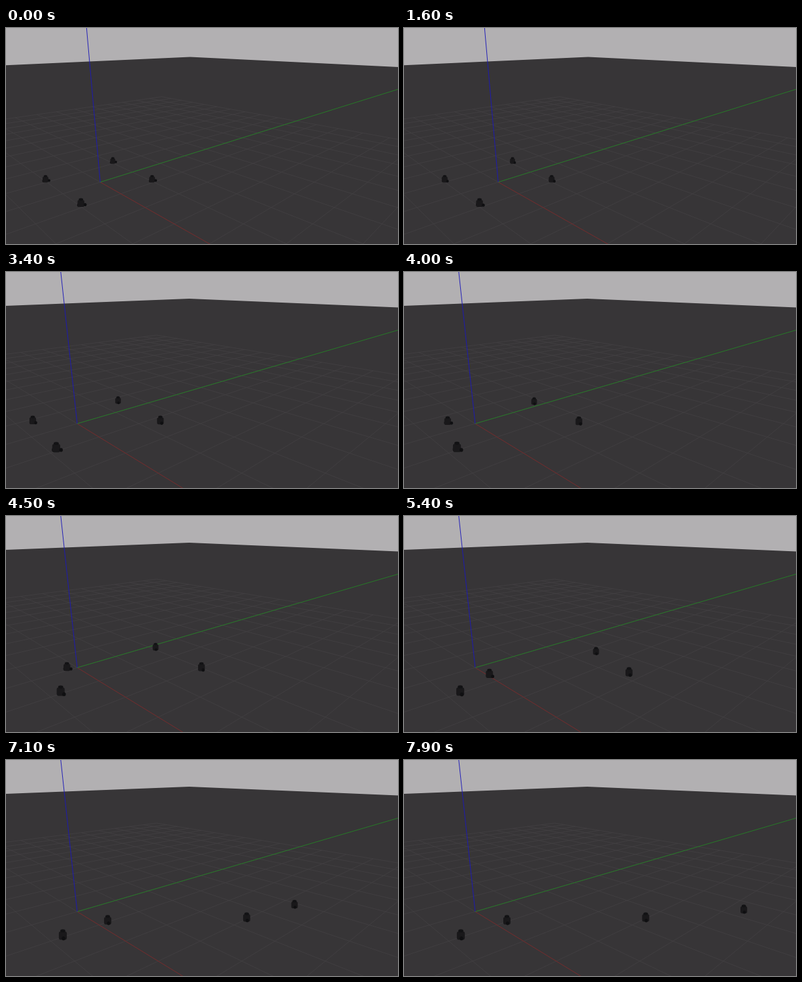
Recreate the animation shown at these times as an HTML page with a canvas. Size 600 by 332 pixels, loop 8 s.

```html
<!DOCTYPE html>
<html lang="en">
<head>
<meta charset="utf-8">
<title>Robots on a ground plane</title>
<style>
html, body { margin: 0; width: 100%; height: 100%; overflow: hidden; background: #373537; }
canvas { display: block; width: 600px; height: 332px; }
</style>
</head>
<body>
<canvas id="stage" width="600" height="332"></canvas>
<script>
const ctx = document.getElementById('stage').getContext('2d');
const W = 600, H = 332, LOOP = 8000, STEP = 100;
const FOCAL = 519.6, PITCH = 0.275643, NEAR = 0.2;
const COS = Math.cos(PITCH), SIN = Math.sin(PITCH);

// World origin relative to the camera, before and after the zoom
const FAR = { ahead: 8.3, right: -2.69, height: 3.62 };
const CLOSE = { ahead: 7.22, right: -2.863, height: 3.087 };

// Ground points are [ahead, right] of the origin as the camera faces;
// mid is the second when a robot is halfway, swing how far it turns aside
const ROBOTS = [
  { from: [1.66, -0.08], to: [-0.05, 6.22], mid: 3.4, swing: 0, cruise: true },
  { from: [0.21, -1.53], to: [-0.465, 0.863], mid: 4.4, swing: 1.2 },
  { from: [0.21, 1.35], to: [-0.32, 3.88], mid: 4.25, swing: 0.3 },
  { from: [-1.19, -0.09], to: [-1.16, 0.13], mid: 3.4, swing: 1.2 }
];
const SOFT = 0.65, SHARP = 0.35, LAG = 0.5, CRUISE_TIME = 4.5;

const mix = (a, b, k) => a + (b - a) * k;

// Smooth step around mid, and a smooth start into constant speed
const settle = (t, mid, width) => 1 / (1 + Math.exp((mid - t) / width));
const cruise = (t, mid, width) =>
  width * Math.log(1 + Math.exp((t - mid) / width)) / CRUISE_TIME;

function viewAt(t) {
  const k = Math.min(1, Math.max(0, (t - 2.8) / 0.5));
  const view = {};
  for (const key in FAR) view[key] = mix(FAR[key], CLOSE[key], k);
  return view;
}

// World axes run diagonally to the camera
const world = (x, y, z = 0) => [(y - x) * Math.SQRT1_2, (x + y) * Math.SQRT1_2, z];

// Camera space: right, down, depth
function toCamera(view, [ahead, right, z = 0]) {
  const f = view.ahead + ahead, h = view.height - z;
  return [view.right + right, h * COS - f * SIN, f * COS + h * SIN];
}

const toScreen = ([r, d, depth]) => [W / 2 + FOCAL * r / depth, H / 2 + FOCAL * d / depth];

function line(view, from, to, color, width) {
  let a = toCamera(view, from), b = toCamera(view, to);
  if (a[2] < b[2]) [a, b] = [b, a];
  if (a[2] < NEAR) return;
  if (b[2] < NEAR) {
    const k = (a[2] - NEAR) / (a[2] - b[2]);
    b = a.map((v, i) => mix(v, b[i], k));
  }
  ctx.strokeStyle = color;
  ctx.lineWidth = width;
  ctx.beginPath();
  ctx.moveTo(...toScreen(a));
  ctx.lineTo(...toScreen(b));
  ctx.stroke();
}

function drawGround(view) {
  ctx.fillStyle = '#b2b0b2';
  ctx.fillRect(0, 0, W, H);
  ctx.fillStyle = '#373537';
  ctx.beginPath();
  for (const corner of [world(-50, -50), world(-50, 50), world(50, 50)]) {
    ctx.lineTo(...toScreen(toCamera(view, corner)));
  }
  ctx.lineTo(W * 10, H * 2);
  ctx.lineTo(-W * 10, H * 2);
  ctx.fill();
  for (let i = -10; i <= 10; i++) {
    line(view, world(i, -10), world(i, 10), '#434143', 0.8);
    line(view, world(-10, i), world(10, i), '#434143', 0.8);
  }
  const origin = world(0, 0);
  line(view, origin, world(10, 0), '#74292a', 1);
  line(view, origin, world(0, 30), '#267a27', 1);
  line(view, origin, world(0, 0, 8), '#1c19b8', 0.95);
}

function oval(x, y, rx, ry, color) {
  ctx.fillStyle = color;
  ctx.beginPath();
  ctx.ellipse(x, y, rx, ry, 0, 0, Math.PI * 2);
  ctx.fill();
}

function drawRobot(view, spot, turn) {
  const p = toCamera(view, spot), s = FOCAL / p[2];
  const c = Math.cos(turn), n = Math.sin(turn);
  ctx.save();
  ctx.translate(...toScreen(p));
  ctx.scale(s, s);
  oval(-c * 0.07, 0.05 - n * 0.02, 0.03, 0.04, '#101012');
  ctx.fillStyle = '#19181a';
  ctx.beginPath();
  ctx.roundRect(-0.078 - c * 0.012, -0.07, 0.156, 0.165, 0.04);
  ctx.fill();
  oval(-c * 0.012, -0.08, 0.05, 0.03, '#121214');
  oval(c * 0.085, 0.04 + n * 0.03, 0.035, 0.038, '#0f0f11');
  ctx.restore();
}

function draw(now) {
  const t = Math.floor(now % LOOP / STEP) * STEP / 1000;
  const view = viewAt(t);
  drawGround(view);
  for (const { from, to, mid, swing, ...bot } of ROBOTS) {
    const ease = bot.cruise ? cruise : settle;
    const across = ease(t, mid, SOFT), along = ease(t, mid + LAG, SHARP);
    const turn = 1.45 * settle(t, 1.6, 0.3) - swing * 4 * across * (1 - across);
    drawRobot(view, [mix(from[0], to[0], along), mix(from[1], to[1], across)], turn);
  }
}

const start = performance.now();
function tick() {
  draw(performance.now() - start);
  requestAnimationFrame(tick);
}
tick();
</script>
</body>
</html>
```
